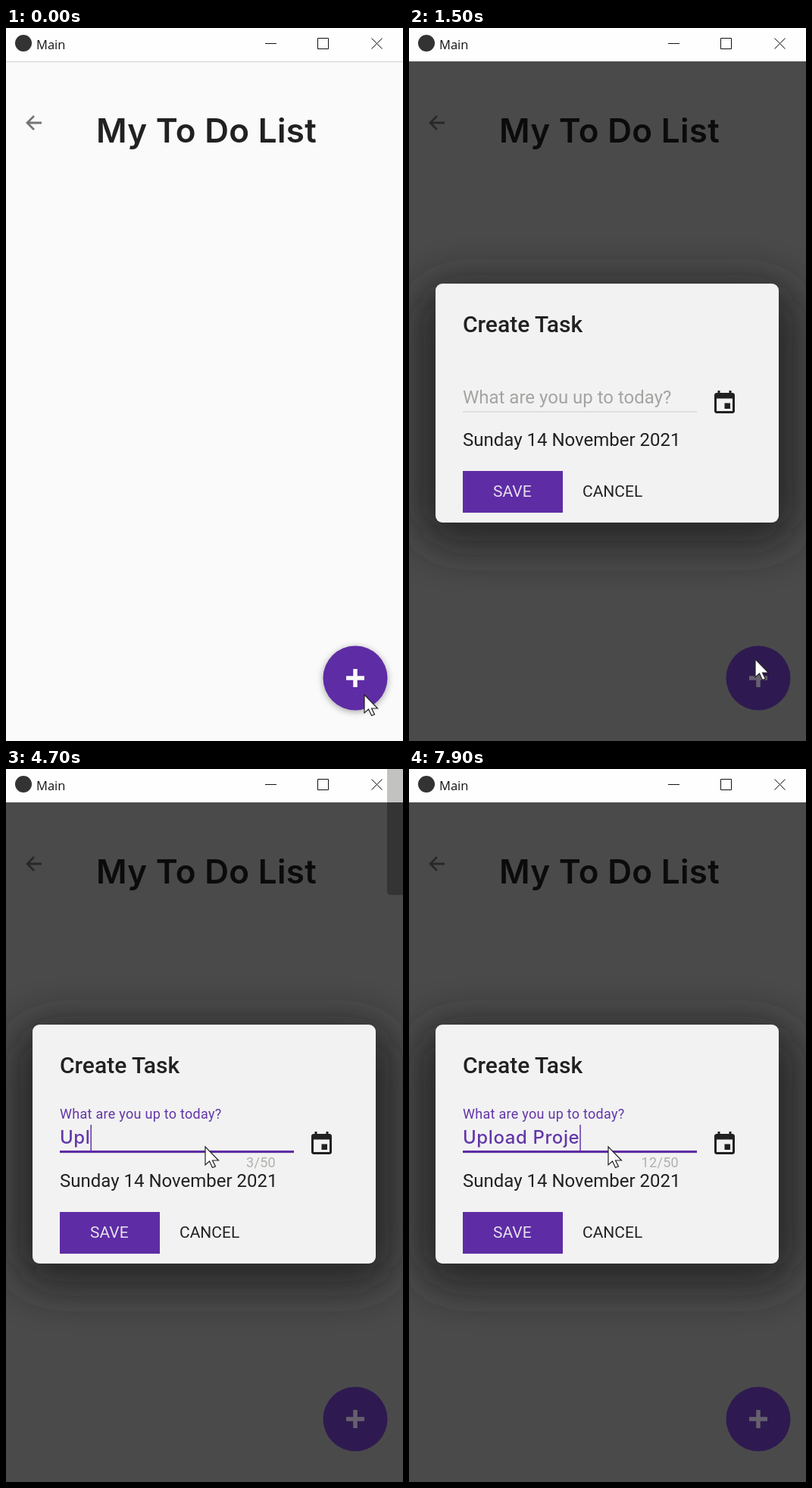
These frames come from a looping animation (524 by 940 pixels, 8 s). An HTML page:

```html
<!DOCTYPE html>
<html lang="en">
<head>
<meta charset="utf-8">
<style>
  html, body { margin: 0; height: 100%; overflow: hidden; }
  svg {
    display: block; width: 524px; height: 940px;
    --bg: #fafafa; --ink: #212121; --arrow: #757575; --fab: #5e2ca5; --plus: #fafafa;
    --line: #cfcfcf; --shade: #77757c; --shade-alpha: .6; --card: #f2f2ed;
  }
  svg.opening { --bg: #e3e8ea; --arrow: #6d6f70; --fab: #5b2aa0; --plus: #e0e0e0; }
  svg.dim {
    --bg: #4a4a4b; --ink: #0b0b0b; --arrow: #28282a; --fab: #2e1a50; --plus: #66606e;
    --line: #4a4a4b; --shade: #222224; --shade-alpha: .8; --card: #f2f2f2;
  }
  text { font-family: Roboto, sans-serif; fill: #212121; white-space: pre; }
  .geo { font-family: Inter, sans-serif; }
  .stroke { fill: none; stroke: #111; }
</style>
</head>
<body>
<svg id="stage" viewBox="0 0 524 940">
  <defs>
    <filter id="wide" x="-40%" y="-40%" width="180%" height="180%"><feGaussianBlur stdDeviation="27"/></filter>
    <filter id="soft" x="-50%" y="-50%" width="200%" height="200%"><feGaussianBlur stdDeviation="4"/></filter>
  </defs>

  <rect width="524" height="940" fill="var(--bg)"/>
  <path d="M47 125H28.500M37 116L28 125L37 134" fill="none" stroke="var(--arrow)" stroke-width="2.800"/>
  <text class="geo" x="119" y="151" font-size="44" font-weight="600" letter-spacing=".3" style="fill:var(--ink)">My To Do List</text>

  <circle id="fabShadow" cx="461" cy="859" r="43" fill="#777" opacity=".6" filter="url(#soft)"/>
  <circle cx="461" cy="857" r="42.500" fill="var(--fab)"/>
  <path d="M449 857H473M461 845V869" stroke="var(--plus)" stroke-width="5.500"/>

  <g id="dialog">
    <rect x="10" y="335" width="504" height="350" rx="50" fill="var(--shade)" opacity="var(--shade-alpha)" filter="url(#wide)"/>
    <rect x="35" y="337" width="453" height="315" rx="9" fill="var(--card)"/>
    <text x="71" y="401" font-size="30" font-weight="500">Create Task</text>
    <text id="hint" x="71">What are you up to today?</text>
    <path d="M71 506H380" stroke="#d8d8d6" stroke-width="1.500"/>
    <path id="underline" stroke="#5e2ca5" stroke-width="3"/>
    <text id="typed" class="geo" x="71" y="494" font-size="24" font-weight="500" letter-spacing=".6" style="fill:#6236a8"></text>
    <rect id="caret" y="469" width="1.500" height="34" fill="#6236a8"/>
    <text id="count" x="356" y="525" font-size="18" letter-spacing=".3" text-anchor="end" style="fill:#b0b0ae"></text>
    <path transform="translate(398.500 476.500) scale(1.500)" fill="#212121" d="M17 12h-5v5h5zM16 1v2H8V1H6v2H5c-1.100 0-2 .9-2 2v14c0 1.100.9 2 2 2h14c1.100 0 2-.9 2-2V5c0-1.100-.9-2-2-2h-1V1zm3 18H5V8h14z"/>
    <text x="71" y="551" font-size="24">Sunday 14 November 2021</text>
    <rect x="71" y="584" width="132" height="55" fill="#5e2ca5"/>
    <text x="111" y="618" font-size="21" style="fill:#e6e0ee">SAVE</text>
    <text x="229" y="618" font-size="21">CANCEL</text>
  </g>

  <rect width="524" height="44" fill="#fefefe"/>
  <path d="M0 44.500H524" stroke="var(--line)"/>
  <circle cx="23" cy="20" r="11" fill="#333"/>
  <text x="40" y="28" font-size="16.500" style="font-family:'Open Sans',sans-serif;fill:#111">Main</text>
  <path class="stroke" d="M342 20.500H357M411.500 13.500H425.500V27.500H411.500ZM482.500 13.500L496.500 27.500M496.500 13.500L482.500 27.500"/>

  <g id="strip">
    <rect x="503" width="21" height="44" fill="#c2c2c0"/>
    <path d="M503 44H524V166H508Q503 166 503 161Z" fill="#343435"/>
  </g>

  <path id="mouse" d="M0 0V24L5.500 19L9.500 27.500L13.500 26L9.500 18H17.500Z" fill="#fff" stroke="#222" stroke-width="1.200"/>
</svg>

<script>
const LOOP = 8000, STEP = 100, FOCUS = 2800, PHRASE = 'Upload Proje';
// time, x, y of the pointer tip
const TRACK = [[0, 473, 879], [300, 473, 879], [800, 457, 832], [1500, 457, 832], [2100, 273, 507], [2600, 263, 498]];
const $ = id => document.getElementById(id);
const clamp = v => Math.max(0, Math.min(1, v));
const mix = (a, b, k) => a + (b - a) * k;
const set = (id, attrs) => Object.entries(attrs).forEach(([k, v]) => $(id).setAttribute(k, v));
const show = (id, on) => { $(id).style.display = on ? '' : 'none'; };

function pointer(t) {
  const i = TRACK.findIndex(p => p[0] > t);
  if (i < 0) return TRACK.at(-1).slice(1);
  const [a, b] = [TRACK[i - 1], TRACK[i]];
  const k = (t - a[0]) / (b[0] - a[0]);
  return [mix(a[1], b[1], k), mix(a[2], b[2], k)];
}

function draw(t) {
  const dim = t >= 1500, open = t >= 1400, pressed = t >= 800 && t < 1300;
  $('stage').setAttribute('class', dim ? 'dim' : open ? 'opening' : '');
  show('dialog', open);
  show('fabShadow', !dim);
  set('fabShadow', pressed ? { r: 48, cy: 866 } : { r: 43, cy: 859 });

  const focus = clamp((t - FOCUS) / 200), focused = t >= FOCUS;
  set('hint', { y: mix(495, 461, focus), 'font-size': mix(24, 18, focus), 'letter-spacing': .28 * focus });
  $('hint').style.fill = focused ? '#6236a8' : '#a4a4a2';
  set('underline', { d: `M${225.5 - 154.5 * focus} 504.500H${225.5 + 154.5 * focus}` });

  const n = Math.max(0, Math.min(PHRASE.length, Math.floor((t - 3650) / 350)));
  $('typed').textContent = PHRASE.slice(0, n);
  $('count').textContent = n + '/50';
  show('count', focused);
  show('underline', focused);
  show('caret', n > 0 || focused && (t - FOCUS) % 1000 < 500);
  set('caret', { x: 71 + (open && n ? $('typed').getComputedTextLength() : 0) });

  show('strip', t >= 4600 && t < 7500);
  set('mouse', { transform: `translate(${pointer(t)})` });
}

function tick() {
  const t = performance.now() % LOOP;
  draw(Math.floor(t / STEP) * STEP);
  requestAnimationFrame(tick);
}
tick();
</script>
</body>
</html>
```
